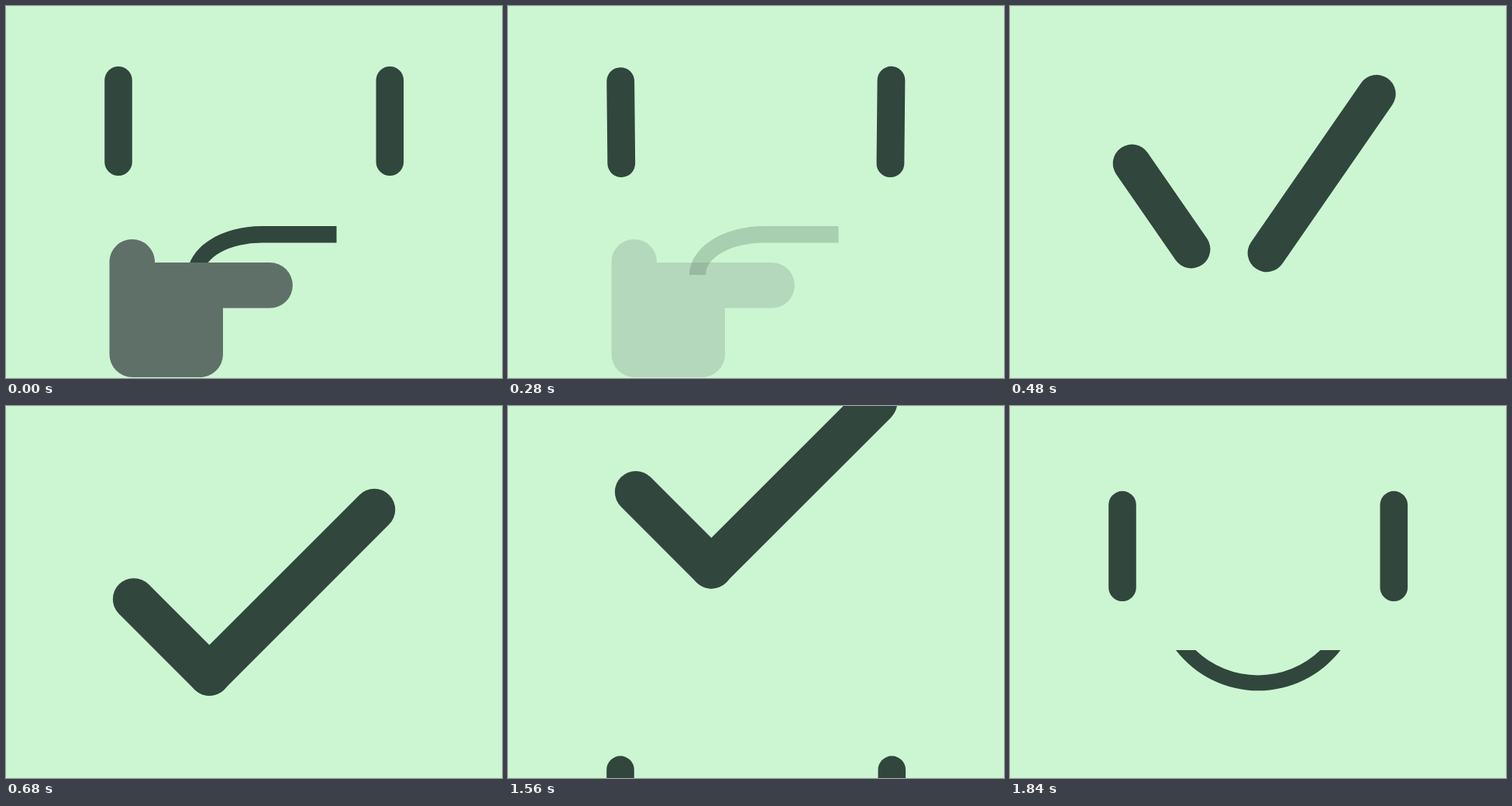
An HTML page that plays this animation: 640 by 480 pixels, repeating every 8000 ms.

```html
<!DOCTYPE html>
<html lang="en">
<head>
<meta charset="utf-8">
<title>Thinking face</title>
<style>
  html, body { margin: 0; width: 100%; height: 100%; overflow: hidden; background: #ccf6d2; }
  svg { display: block; width: 100vw; height: 100vh; }
  line { stroke: #31463d; stroke-linecap: round; }
  .ink { fill: #31463d; }
  #hand { fill: #5f7069; }
</style>
</head>
<body>
<svg viewBox="0 0 640 480">
  <path id="mouth" class="ink" d="M234 347A96 63 0 0 1 330 284H426.5V305.5H330A75 41.5 0 0 0 255 347Z"/>
  <path id="hand" d="M133.5 328.5A29.3 29.3 0 0 1 192 328.5V331H340.5A29.4 29.4 0 0 1 340.5 389.8H280V449.5A29.5 29.5 0 0 1 250.5 479H163A29.5 29.5 0 0 1 133.5 449.5Z"/>
  <g id="bars">
    <line id="left"/>
    <line id="right"/>
  </g>
  <g id="smile">
    <line x1="145" y1="127.6" x2="145" y2="234.2" stroke-width="35.6"/>
    <line x1="495.3" y1="127.6" x2="495.3" y2="234.2" stroke-width="35.6"/>
    <path class="ink" d="M214 315A134 134 0 0 0 426.5 315H400.5A116 116 0 0 1 239.5 315Z"/>
  </g>
</svg>
<script>
  const LOOP = 8000, STEP = 40, HEIGHT = 480;
  const $ = id => document.getElementById(id);
  const clamp = v => Math.min(1, Math.max(0, v));
  const span = (t, start, end) => clamp((t - start) / (end - start));
  const mix = (a, b, p) => a + (b - a) * p;
  const easeInOut = (u, power) =>
    u < 0.5 ? (2 * u) ** power / 2 : 1 - (2 - 2 * u) ** power / 2;

  // Each bar turns from an upright eye into one arm of the tick.
  const bars = [
    { el: $('left'), from: { x: 145, y: 148.5, len: 105.4 }, to: { x: 213.75, y: 298, len: 138.2 }, turn: 1, stretch: 6.4 },
    { el: $('right'), from: { x: 495.3, y: 148.5, len: 105.4 }, to: { x: 368.75, y: 240.25, len: 301.2 }, turn: -1, stretch: 0 }
  ];

  function poseBar({ el, from, to, turn, stretch }, p) {
    const bump = 4 * p * (1 - p);
    const angle = turn * (45 * p + 2 * bump) * Math.PI / 180;
    const half = (mix(from.len, to.len, p) + stretch * bump) / 2;
    const x = mix(from.x, to.x, p), y = mix(from.y, to.y, p);
    const dx = half * Math.sin(angle), dy = half * Math.cos(angle);
    const attrs = { x1: x - dx, y1: y - dy, x2: x + dx, y2: y + dy, 'stroke-width': mix(35.6, 54, p) };
    for (const name in attrs) el.setAttribute(name, attrs[name]);
  }

  function draw(t) {
    const fade = 1 - span(t, 160, 314);
    $('mouth').setAttribute('opacity', fade);
    $('hand').setAttribute('opacity', fade);

    const morph = easeInOut(span(t, 200, 680), 3.5);
    bars.forEach(bar => poseBar(bar, morph));

    const push = t >= 1840 ? 1 : easeInOut(span(t, 1352, 1852), 3);
    $('bars').setAttribute('transform', `translate(0 ${-HEIGHT * push})`);
    $('smile').setAttribute('transform', `translate(0 ${HEIGHT * (1 - push)})`);
  }

  const begin = performance.now();
  function tick() {
    const t = (performance.now() - begin) % LOOP;
    // Motion runs at 25 steps a second; the opening pose holds until 200 ms.
    const stepped = Math.floor(t / STEP) * STEP;
    draw(stepped < 200 ? 0 : stepped);
    requestAnimationFrame(tick);
  }
  tick();
</script>
</body>
</html>
```
